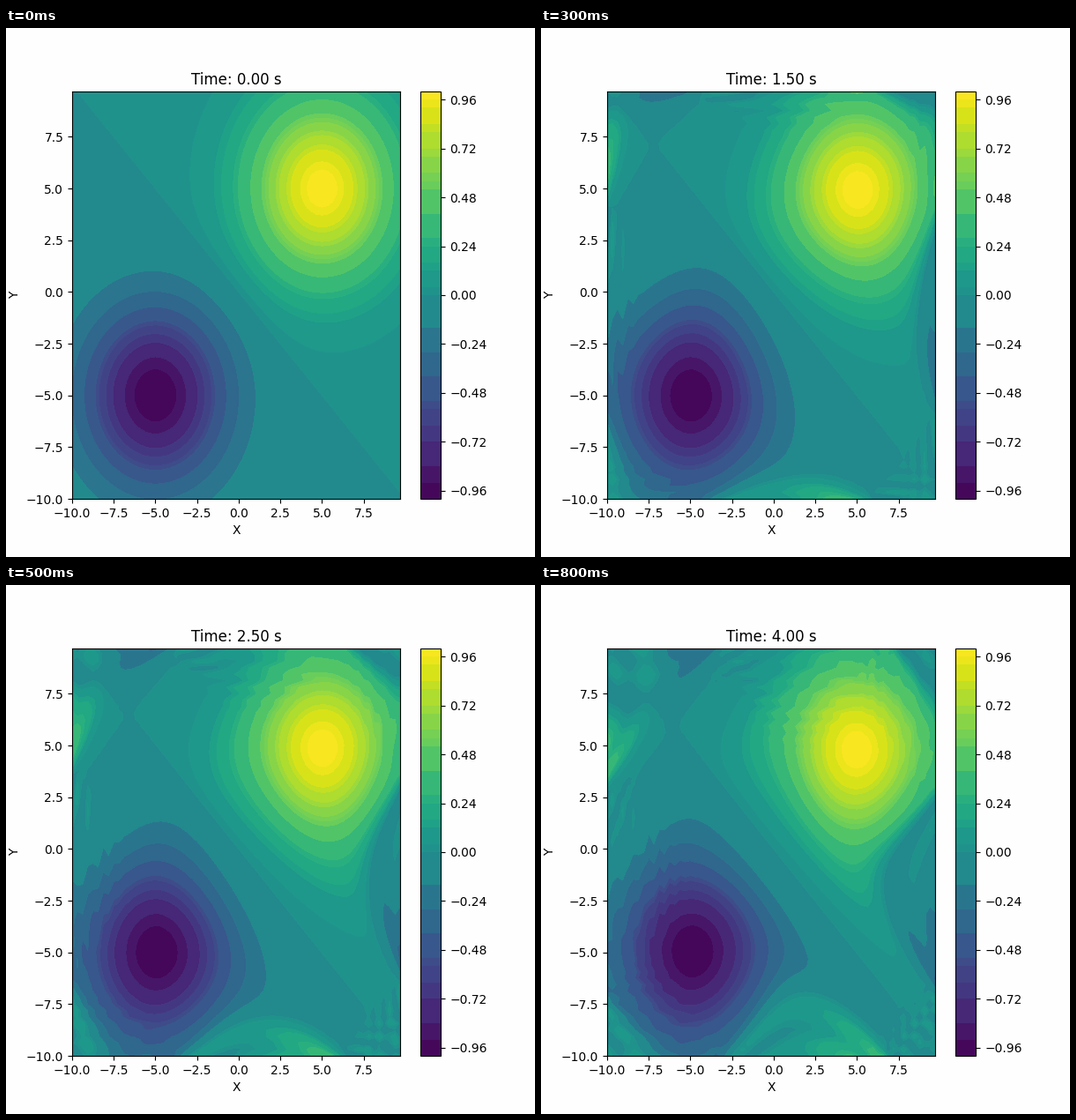
Animation of 600x600 px, one loop 0.9 s. Source, as a matplotlib script:

```python
import numpy as np
import matplotlib.pyplot as plt
from matplotlib.animation import FuncAnimation
from matplotlib.colors import ListedColormap

N, SIZE, NU = 64, 20.0, 0.001
FRAMES, FRAME_TIME, SUBSTEPS = 9, 0.5, 20
H = SIZE / N

axis = np.linspace(-SIZE / 2, SIZE / 2, N, endpoint=False)
X, Y = np.meshgrid(axis, axis)
k = 2 * np.pi * np.fft.fftfreq(N, d=H)
K2 = k[None, :] ** 2 + k[:, None] ** 2
K2[0, 0] = 1.0


def blob(cx, cy):
    return np.exp(-((X - cx) ** 2 + (Y - cy) ** 2) / 20)


def diff(f, ax_no):
    return (np.roll(f, -1, ax_no) - np.roll(f, 1, ax_no)) / (2 * H)


def laplacian(f):
    near = sum(np.roll(f, s, a) for s in (-1, 1) for a in (0, 1))
    return (near - 4 * f) / H ** 2


def stream(w):
    hat = -np.fft.fft2(w) / K2
    hat[0, 0] = 0
    return np.fft.ifft2(hat).real


def rate(w):
    psi = stream(w)
    swirl = diff(psi, 1) * diff(w, 0) - diff(psi, 0) * diff(w, 1)
    return swirl + NU * laplacian(w)


def rk4(w, dt):
    a = rate(w)
    b = rate(w + dt / 2 * a)
    c = rate(w + dt / 2 * b)
    d = rate(w + dt * c)
    return w + dt / 6 * (a + 2 * b + 2 * c + d)


def simulate():
    w = blob(5, 5) - blob(-5, -5)
    states = [w]
    for _ in range(FRAMES - 1):
        for _ in range(SUBSTEPS):
            w = rk4(w, FRAME_TIME / SUBSTEPS)
        states.append(w)
    return states


levels = np.linspace(-1, 1, 51)
bands = len(levels) - 1
base = np.rint(plt.get_cmap("viridis")((np.arange(bands) + 0.5) / bands)[:, :3] * 255)
cells = base.astype(int) // (32, 16, 32)


def palette(w):
    """Merge close shades into area-weighted means."""
    area = np.histogram(np.clip(w, -1, 1), levels)[0] * 42 + 213
    shades = np.empty_like(base)
    for cell in np.unique(cells, axis=0):
        same = (cells == cell).all(axis=1)
        shades[same] = np.average(base[same], axis=0, weights=area[same])
    return np.floor(shades) / 255


def fill(w):
    return ax.contourf(X, Y, w, levels=levels, colors=[tuple(c) for c in palette(w)])


states = simulate()
fig, ax = plt.subplots(figsize=(6, 6), dpi=100, facecolor="#fefefe")
field = fill(states[0])
cbar = fig.colorbar(field, ax=ax)
ax.set_xlabel("X")
ax.set_ylabel("Y")
title = ax.set_title("Time: 0.00 s")


def draw(i):
    global field
    field.remove()
    field = fill(states[i])
    cbar.solids.set_cmap(ListedColormap(palette(states[i])))
    title.set_text(f"Time: {i * FRAME_TIME:.2f} s")
    return field, title


anim = FuncAnimation(fig, draw, frames=FRAMES, interval=100, repeat=True, blit=False)
plt.show()
```
